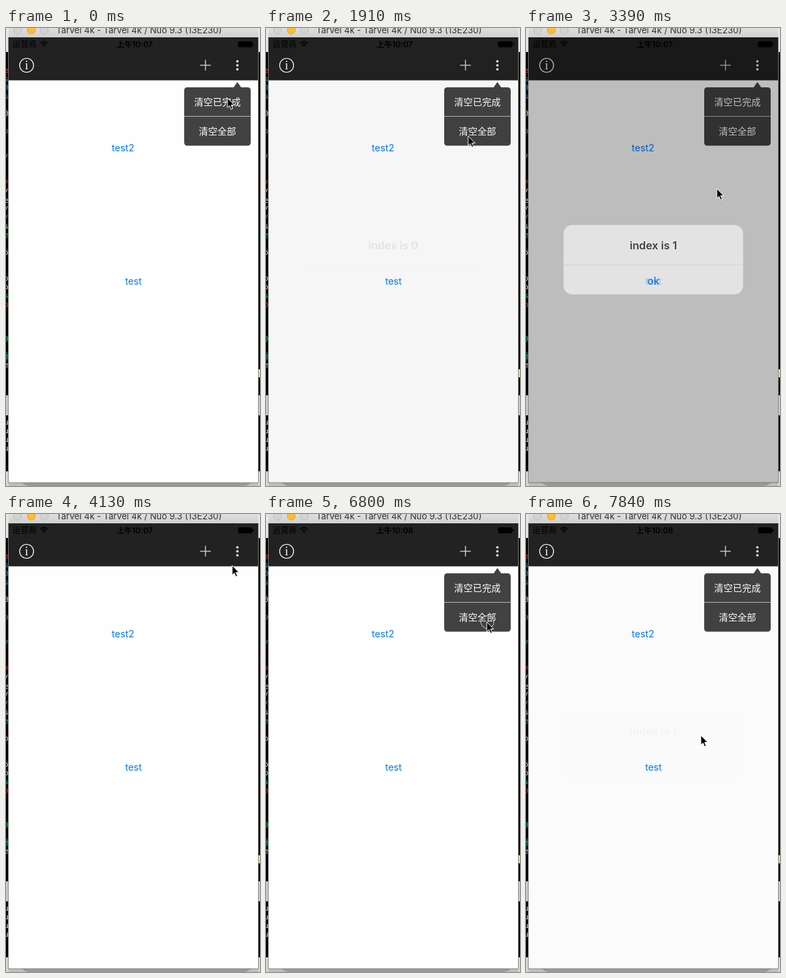
Recreate the animation shown at these times as an HTML page. Size 382 by 687 pixels, loop 7990 ms.

```html
<!DOCTYPE html>
<html lang="zh-CN">
<head>
<meta charset="utf-8">
<title>Popover menu</title>
<style>
html, body { margin: 0; width: 100%; height: 100%; overflow: hidden; background: #000 }
svg { display: block; width: 382px; height: 687px }
text { font-family: Inter, "Noto Sans CJK SC", "Noto Sans CJK", sans-serif; text-anchor: middle }
.code { font: 11px "DejaVu Sans Mono", monospace; text-anchor: start }
.link { font-size: 14.3px; fill: #007aff }
.item { font-size: 14px; fill: #fff }
.alert { font-size: 16.3px; font-weight: 600 }
</style>
</head>
<body>
<svg viewBox="0 0 382 687">
  <defs>
    <linearGradient id="bar" x2="0" y2="1">
      <stop stop-color="#dedede"/><stop offset="1" stop-color="#d0d0d0"/>
    </linearGradient>
  </defs>

  <!-- desktop behind the window -->
  <rect width="382" height="687"/>
  <rect width="382" height="36" fill="#e6e6e6"/>
  <rect y="551" width="382" height="30" fill="#c9c9c9"/>
  <rect y="665" width="382" height="22" fill="#d6d6d6"/>
  <rect y="486" width="4" height="13" fill="#123018"/>
  <rect x="379" y="512" width="3" height="12" fill="#e8d98a"/>
  <g id="code"></g>

  <!-- window frame -->
  <path d="M4 680H379V687H4z" fill="#bdbdbd"/>
  <path d="M24 682H368Q364 687 356 687H36Q28 687 24 682z" fill="#999"/>
  <rect x="3.5" y="14" width="376" height="668" fill="#fefefe" stroke="#777" stroke-width=".8"/>
  <rect x="4" width="375" height="14" fill="url(#bar)"/>
  <g fill="#d3d3d3" stroke="#bdbdbd">
    <circle cx="17.5" cy="3" r="6"/>
    <circle cx="57.5" cy="3" r="6"/>
    <circle cx="38" cy="3" r="6" fill="#fdbe2f" stroke="#e0a028"/>
  </g>
  <text x="200" y="8" font-size="13.2" fill="#333">Tarvel 4k - Tarvel 4k / Nuo 9.3 (13E230)</text>

  <!-- header -->
  <rect x="4" y="14" width="375" height="64.5" fill="#222"/>
  <text x="28" y="28.5" font-size="12">运营商</text>
  <path d="M51.5 22.5Q57 17.5 62.5 22.5M53.5 24.8Q57 21.5 60.5 24.8" fill="none" stroke="#000" stroke-width="1.6"/>
  <path d="M57 28.5L54.8 26.3Q57 24.5 59.2 26.3z"/>
  <text id="clock" x="193.5" y="28.5" font-size="11.8" font-weight="600"></text>
  <rect x="349.5" y="20.5" width="20.5" height="8" rx="1.5" stroke="#000"/>
  <rect x="371" y="22.8" width="1.7" height="3.5" rx=".8"/>
  <circle cx="31" cy="56" r="10.5" fill="none" stroke="#fff" stroke-width="1.2"/>
  <text x="31" y="62" fill="#fff" style="font:18px 'Liberation Serif',serif">i</text>
  <path d="M292 55.8H308M300 47.8V63.8" stroke="#ddd" stroke-width="1.3"/>
  <path d="M348 50v0m0 6v0m0 6v0" stroke="#fff" stroke-width="3.6" stroke-linecap="round"/>

  <text class="link" x="176" y="185">test2</text>
  <text class="link" x="191.7" y="385">test</text>

  <g id="menu">
    <path d="M342 89.5L348 81L354 89.5z" fill="#424242"/>
    <rect x="268" y="89" width="100" height="87.5" rx="4.5" fill="#424242"/>
    <path d="M268 132.5H368" stroke="#b8b8b8"/>
    <text class="item" x="318" y="116">清空已完成</text>
    <text class="item" x="318" y="160">清空全部</text>
  </g>

  <rect id="dim" x="4" y="14" width="375" height="668"/>
  <g id="alert">
    <rect x="56.5" y="295.5" width="270" height="104" rx="13" fill="#f9f9f9"/>
    <path d="M56.5 355.5H326.5" stroke="#d6d6d9" stroke-width=".8"/>
    <text id="title" class="alert" x="191.5" y="332"></text>
    <text class="alert" x="191.5" y="384.5" fill="#007aff">ok</text>
  </g>

  <g id="cursor">
    <g id="ring" fill="none">
      <circle cx="1" r="9.5" stroke="#fff"/>
      <circle cx="1" r="8.6" stroke="#222" stroke-width=".8"/>
    </g>
    <path d="M0 0V14.5L3.3 11.5L5.7 17L8.1 16L5.7 10.6H10.3z" stroke="#fff"/>
  </g>
</svg>

<script>
const $ = id => document.getElementById(id);
const set = (id, name, value) => $(id).setAttribute(name, value);
const clamp = v => Math.min(1, Math.max(0, v));
const smooth = u => u * u * (3 - 2 * u);
const easeOut = u => 1 - (1 - u) ** 2;

const LOOP = 7990, FRAMES = 54, STEP = LOOP / FRAMES;
const HOLD = 230, REST = 130; // button held down; pause before pressing

// Slivers of code at the window's left edge
let seed = 7;
const random = () => (seed = seed * 16807 % 2147483647) / 2147483647;
const pick = list => list[Math.floor(random() * list.length)];
const glyph = (y, fill, s, weight) =>
  `<text class="code" x="-3" y="${y}" fill="${fill}" font-weight="${weight}">${s}</text>`;
let code = '';
for (let y = 67; y < 515; y += 13)
  if (random() < 0.6) code += glyph(y, pick(['#ddd', '#ddd', '#1c7', '#29d', '#e33']), pick('ceos0/'), 400);
for (let y = 595; y < 640; y += 13) code += glyph(y, '#fff', 'u', 700);
$('code').innerHTML = code;

// What the hand does: press time (or passing time, without an action), place, action
const ok = time => ({ time, x: 220, y: 374, act: 'ok' });
const item = (time, index, x, y) => ({ time, x, y, act: 'item', index });
const toggle = (time, x, y) => ({ time, x, y, act: 'menu' });
const pass = (time, x, y) => ({ time, x, y });
const moves = [
  item(140, 0, 333, 105), ok(1328),
  item(2050, 1, 304, 162), ok(3070), pass(3397, 287, 241),
  toggle(3850, 338, 83), toggle(4400, 348, 55),
  item(5015, 0, 333, 105), pass(5465, 313, 132), ok(5790),
  item(6660, 1, 332, 162), ok(7180), pass(7828, 263, 332)
];
const [hide, show] = moves.filter(m => m.act === 'menu');

function pointer(t) {
  const i = moves.findIndex(m => m.time > t);
  const b = moves.at(i), a = i > 0 ? moves[i - 1] : b;
  const from = a.time + (a.act ? HOLD : 0), to = b.time - (b.act ? REST : 0);
  const u = smooth(clamp((t - from) / (to - from)));
  return [a.x + (b.x - a.x) * u, a.y + (b.y - a.y) * u];
}

function draw(now) {
  const t = Math.floor((now % LOOP + 25) / STEP) % FRAMES * (STEP - 0.25);

  $('clock').textContent = t < 5100 ? '上午10:07' : '上午10:08';
  set('menu', 'opacity', 1 - clamp((t - hide.time) / 150) + clamp((t - show.time) / 150));

  // An item opens an alert on release, the next ok closes it
  const open = moves.findLast(m => m.act === 'item' && m.time + HOLD <= t) || moves[0];
  const close = moves.find(m => m.act === 'ok' && m.time > open.time);
  const shown = easeOut(clamp((t - open.time - HOLD) / 400));
  const alpha = shown * (1 - easeOut(clamp((t - close.time - HOLD) / 500)));
  set('dim', 'opacity', 0.4 * alpha);
  set('alert', 'opacity', alpha);
  set('alert', 'transform', `translate(191.5 347.5) scale(${1.2 - 0.2 * shown}) translate(-191.5 -347.5)`);
  $('title').textContent = 'index is ' + open.index;

  set('cursor', 'transform', `translate(${pointer(t)})`);
  set('ring', 'opacity', +moves.some(m => m.act && t >= m.time && t < m.time + HOLD));
  requestAnimationFrame(draw);
}
requestAnimationFrame(draw);
</script>
</body>
</html>
```
